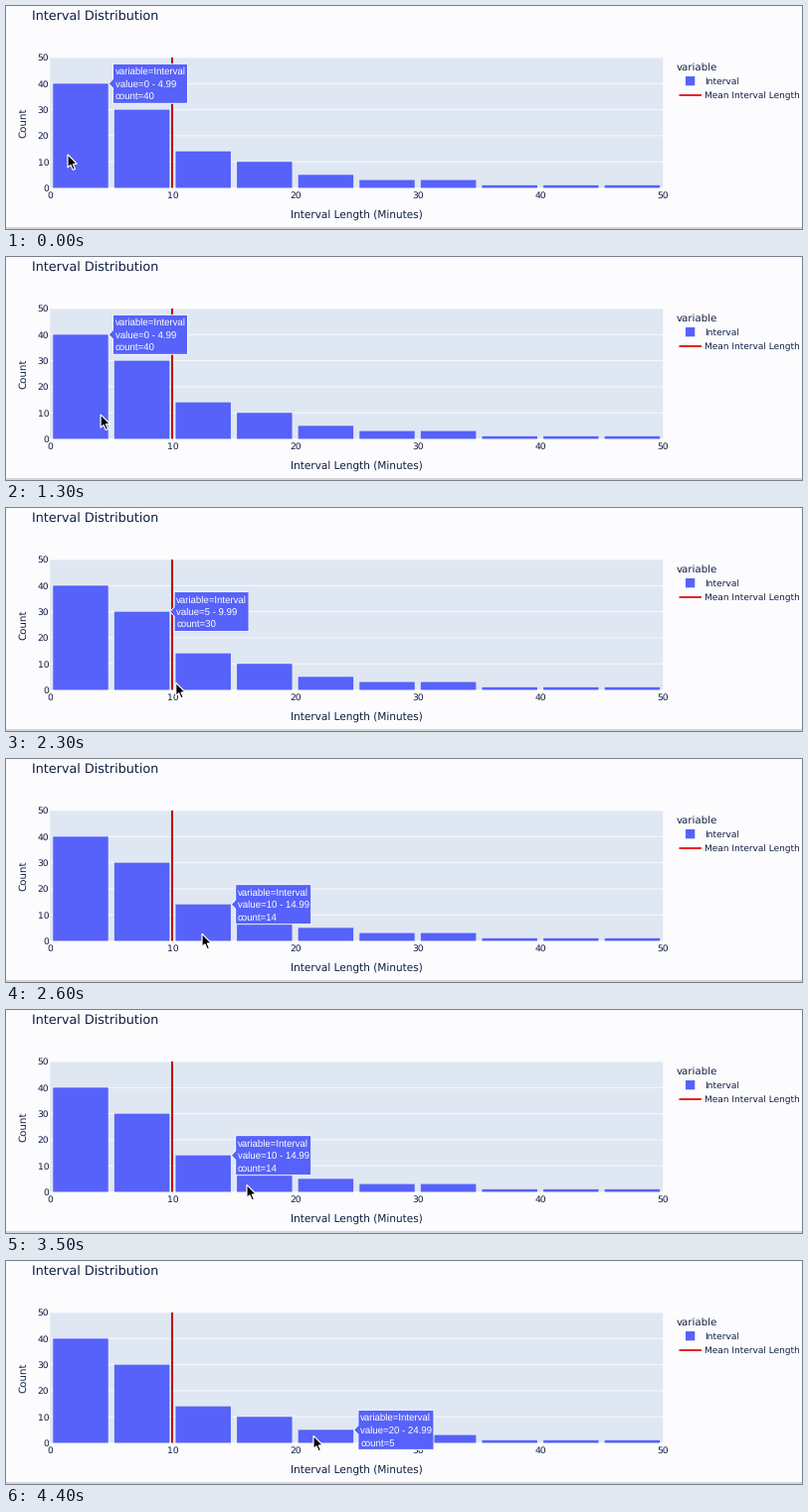
Animation of 800x225 px, one loop 4500 ms. Source, as a matplotlib script:

```python
import numpy as np
import matplotlib.pyplot as plt
from matplotlib.animation import FuncAnimation
from matplotlib.patches import Polygon, Rectangle

W, H, DPI = 800, 225, 100
FRAMES, INTERVAL = 45, 100
PT = 72 / DPI  # points per pixel

PAGE, PLOT, BLUE, RED, INK = "#fcfcfe", "#dfe7f3", "#5662f9", "#e00000", "#101d42"
COUNTS = [40, 30, 14, 10, 5, 3, 3, 1, 1, 1]
LEFT, RIGHT, TOP, BASE = 44.2, 660.2, 52, 183.5
BIN = (RIGHT - LEFT) / len(COUNTS)
GAP = 0.1 * BIN

# Cursor stops along x; the gaps between them are steady moves or rests
STOP_FRAMES = [0, 5, 10, 18, 26, 33, 35, 41, 44]
STOP_X = [62, 76, 76, 127, 197, 211, 242, 254, 309]
ARROW = np.array([(0, 0), (0, 13.2), (3, 10.5), (5.2, 15.6), (7.5, 14.6),
                  (5.3, 9.7), (9.4, 9.5)])

plt.rcParams["text.hinting"] = "none"
fig = plt.figure(figsize=(W / DPI, H / DPI), dpi=DPI, facecolor=PAGE)
ax = fig.add_axes([0, 0, 1, 1])
ax.set_xlim(0, W)
ax.set_ylim(H, 0)
ax.axis("off")


def x_pos(minutes):
    return LEFT + minutes * (RIGHT - LEFT) / 50


def y_pos(count):
    return BASE - count * (BASE - TOP) / 50


def label(x, y, text, size, **kw):
    kw = {"family": "DejaVu Sans", "color": INK, "va": "baseline", **kw}
    return ax.text(x, y, text, fontsize=size * PT, **kw)


def box(x, y, w, h, color, z):
    ax.add_patch(Rectangle((x, y), w, h, fc=color, lw=0, zorder=z, snap=False))


def line(xs, ys, color, width, z, **kw):
    ax.plot(xs, ys, color=color, lw=width * PT, zorder=z, snap=False,
            solid_capstyle="butt", **kw)


def draw_chart():
    box(LEFT, TOP, RIGHT - LEFT, BASE - TOP, PLOT, 1)
    for value in range(0, 51, 10):
        y = y_pos(value)
        line([LEFT, RIGHT], [y, y], "#f8fafd", 1, 2)
        label(43.3, y + 3.3, value, 9.1, ha="right")
        label(x_pos(value) + 0.3, 193.8, value, 9.1, ha="center")
    for i, count in enumerate(COUNTS):
        y = y_pos(count)
        box(LEFT + i * BIN + GAP / 2, y, BIN - GAP, BASE - y, BLUE, 3)

    mean = [167, 167]
    line(mean, [TOP, BASE], RED, 2, 4)
    line(mean, [TOP, BASE], "black", 0.8, 5, ls=(0, (1.2, 1.6)), alpha=0.75)

    label(26.5, 15.1, "Interval Distribution", 12.7)
    label(352.5, 213.7, "Interval Length (Minutes)", 10.55, ha="center")
    label(17.8, 117.5, "Count", 10.3, rotation=90, ha="center", va="center")
    label(674, 64.8, "variable", 10.25)
    label(702, 79.3, "Interval", 9.1)
    label(702, 93.4, "Mean Interval Length", 9.05)
    box(683, 71, 9.3, 9.3, BLUE, 3)
    line([676.5, 699], [90, 90], RED, 1.7, 3)
    line([0, W], [224, 224], "#b4b4b6", 1, 3)


draw_chart()
bubble = ax.add_patch(Polygon([(0, 0)] * 3, fc=BLUE, ec="white", lw=0.9 * PT,
                              zorder=8, snap=False))
bubble_lines = [label(0, 0, "", 9.65, family="Liberation Sans", color="white",
                      zorder=9) for _ in range(3)]
cursor = ax.add_patch(Polygon(ARROW, fc="black", ec="white", lw=1.2 * PT,
                              zorder=10, snap=False))


def cursor_at(frame):
    """Slide down a slope, then level out near the axis."""
    x = np.interp(frame, STOP_FRAMES, STOP_X)
    return np.array([x, min(176.3, 149.8 + 0.277 * (x - 62))])


def show_bubble(index):
    low = 5 * index
    tip = LEFT + (index + 1) * BIN - GAP / 2 + 0.4
    left, mid = tip + 4.4, y_pos(COUNTS[index])
    rows = ("variable=Interval", f"value={low} - {low + 4.99:.2f}",
            f"count={COUNTS[index]}")
    for i, (artist, row) in enumerate(zip(bubble_lines, rows)):
        artist.set_text(row)
        artist.set_position((left + 2.2, mid - 9 + 12.6 * i))
    renderer = fig.canvas.get_renderer()
    width = max(t.get_window_extent(renderer).width for t in bubble_lines)
    right = left + width * DPI / fig.dpi + 4
    top, bottom = mid - 20, mid + 20
    bubble.set_xy([(tip, mid), (left, mid - 4.6), (left, top), (right, top),
                   (right, bottom), (left, bottom), (left, mid + 4.6)])


def update(frame):
    cursor.set_xy(ARROW + cursor_at(frame))
    # The bubble follows the cursor one frame late
    hovered_x = cursor_at(max(frame - 1, 0))[0]
    show_bubble(int((hovered_x - LEFT) // BIN))
    return [cursor, bubble, *bubble_lines]


anim = FuncAnimation(fig, update, frames=FRAMES, interval=INTERVAL,
                     repeat=True, repeat_delay=0, blit=False)
plt.show()
```
